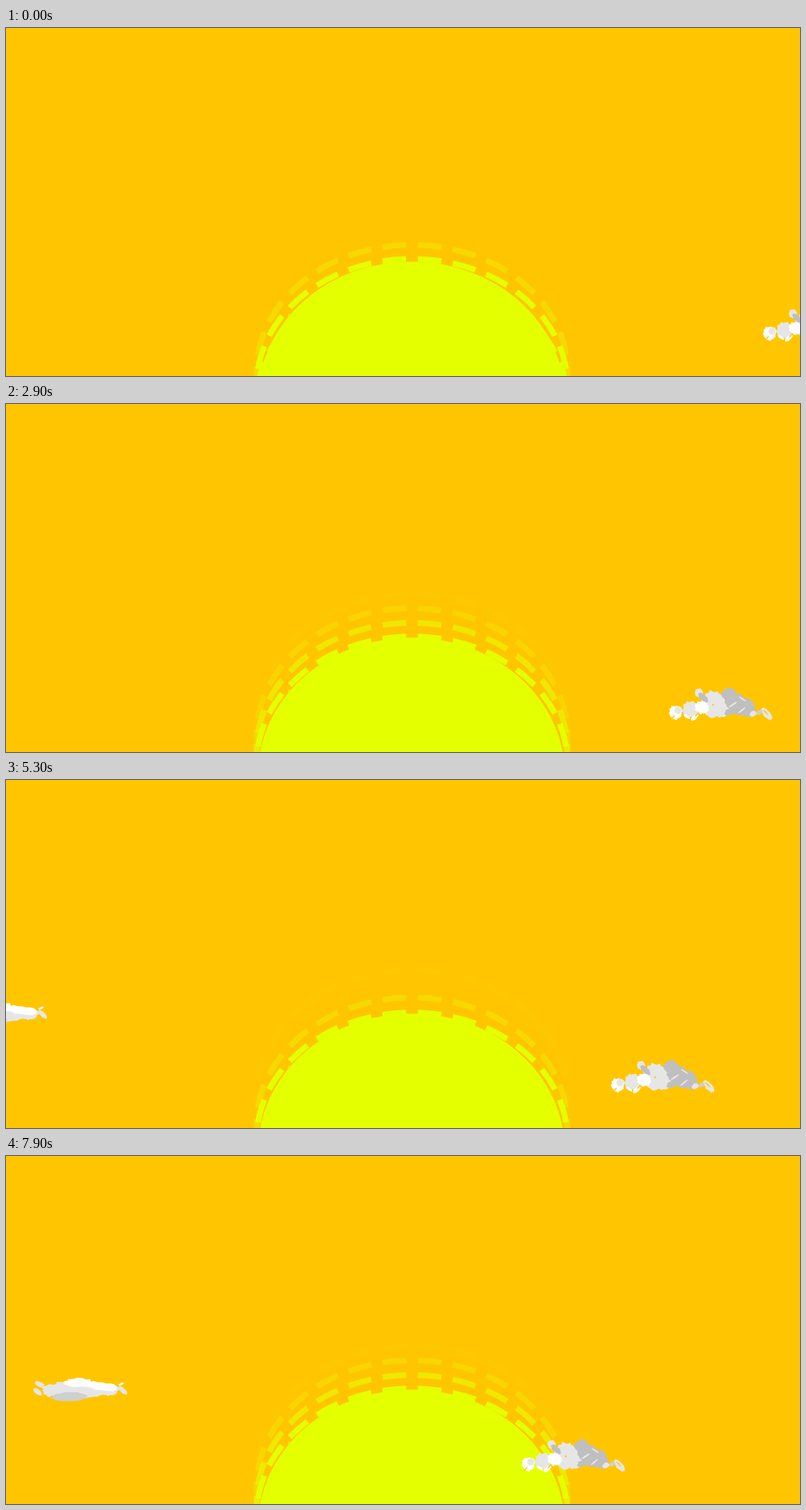
These frames come from a looping animation (1129 by 496 pixels, 8 s). An HTML page with a canvas:

```html
<!DOCTYPE html>
<html lang="en">
<head>
<meta charset="utf-8">
<title>Sunrise</title>
<style>
  html, body { margin: 0; width: 100%; height: 100%; overflow: hidden; background: #ffc600; }
  canvas { display: block; }
</style>
</head>
<body>
<canvas id="sky" width="1129" height="496"></canvas>
<script>
const ctx = document.getElementById('sky').getContext('2d');
const W = 1129, H = 496, LOOP = 8000, STEP = 100;
const SKY = '#ffc600', SUN = '#e4ff00';
const WHITE = '#ffffff', LIGHT = '#e6e6e6', MID = '#cfcfcf', DARK = '#bfbfbf';

// Linear interpolation through [time, value] pairs
function track(keys, t) {
  if (t <= keys[0][0]) return keys[0][1];
  for (let i = 1; i < keys.length; i++) {
    const [t0, a] = keys[i - 1], [t1, b] = keys[i];
    if (t <= t1) return a + (b - a) * (t - t0) / (t1 - t0);
  }
  return keys[keys.length - 1][1];
}

// Each ring: height of its top and opacity over time
const rings = [
  { y: [[0, 309], [1700, 282], [2600, 271]],
    a: [[0, .32], [1700, .12], [2700, .04]] },
  { y: [[0, 329], [1700, 303], [2600, 291]],
    a: [[0, 1], [1700, .55], [2700, .27], [3800, .14], [4500, 0], [5400, 0], [6100, .12], [7200, .27]] },
  { y: [[0, 352.5], [1700, 326.5], [2600, 312], [3800, 311], [4500, 310], [5400, 310], [6100, 311], [7200, 312]],
    a: [[0, 1], [1700, .72], [2700, .6], [3800, .48], [4500, .32], [5400, .32], [6100, .48], [7200, .6]] },
  { y: [[0, 367], [1700, 342], [2600, 331.3]],
    a: [[0, 1]] }
];

const cloudX = [[0, 1077], [1700, 995], [2700, 950], [3600, 920], [4500, 890], [5300, 861],
  [6100, 823], [7200, 770], [7900, 734]];
const cloudY = [[0, 399], [1700, 403], [2900, 403.5], [3800, 401], [5300, 398.5], [6100, 400.5], [7900, 403]];
const wispX = [[3800, -143], [5300, -77], [6100, -42], [7200, 6], [7900, 37]];

function random(seed) {
  return () => {
    seed = (seed * 16807) % 2147483647;
    return seed / 2147483647;
  };
}

// Ragged blob: [x, y, rx, ry, color, tilt]
function blob([x, y, rx, ry, color, tilt = 0], seed) {
  const rnd = random(seed * 7919 + 13), path = new Path2D(), n = 34;
  rnd();
  for (let i = 0; i < n; i++) {
    const q = i / n * Math.PI * 2, k = .86 + .26 * rnd();
    const u = Math.cos(q) * rx * k, v = Math.sin(q) * ry * k;
    path.lineTo(x + u * Math.cos(tilt) - v * Math.sin(tilt), y + u * Math.sin(tilt) + v * Math.cos(tilt));
  }
  path.closePath();
  return { path, color };
}

const cloud = [
  [138, 38, 11, 4.5, LIGHT, .85],
  [128, 36, 5, 3, MID, -.6],
  [42, 8, 5.5, 6.5, LIGHT],
  [63, 24, 19, 19, LIGHT],
  [72, 32, 17, 11, LIGHT],
  [30, 32, 11, 11.5, LIGHT, -.4],
  [9, 36, 9, 10, WHITE],
  [12, 33, 5, 5, LIGHT, -.5],
  [46, 29, 10, 9, WHITE, .4],
  [36, 43, 7, 3, WHITE, -.7],
  [25, 42, 5, 2, WHITE, .6],
  [48, 15, 9, 4, DARK, .75],
  [85, 11, 11, 10, DARK, .5],
  [94, 22, 16, 13, DARK, .6],
  [88, 34, 11, 5, DARK, -.5],
  [113, 29, 9, 14, DARK, -.3],
  [105, 37, 13, 4, DARK, .1],
  [119, 38, 5, 4, LIGHT, -.6],
  [90, 25, 7, 1.3, LIGHT, -.6],
  [104, 17, 6, 1, LIGHT, .6],
  [103, 33, 7, 1.1, LIGHT, -.7],
  [39, 39, 4, .9, SKY, -.8],
  [5, 43, 4, .9, SKY, -.8],
  [62, 25, 1.5, 1.2, SKY],
  [137, 36, 5, .8, SKY, .8]
].map((b, i) => blob(b, i + 1));

const wisp = [
  [12, 10, 9, 3.5, LIGHT, .45],
  [8, 20, 8, 3.5, LIGHT, .65],
  [25, 18, 10, 9, LIGHT, .3],
  [57, 16, 33, 12, LIGHT],
  [85, 20, 27, 8, LIGHT, -.08],
  [111, 18, 13, 7, LIGHT, -.2],
  [129, 18, 8, 3.5, LIGHT, .75],
  [53, 27, 26, 6.5, MID, -.04],
  [66, 7, 20, 6.5, WHITE],
  [98, 12, 22, 6, WHITE, .12],
  [112, 14, 8, 5.5, WHITE],
  [127, 9, 4, 1.5, WHITE, -.4],
  [21, 10, 6, .9, SKY, -.4],
  [125, 20, 3, 1, SKY, .6]
].map((b, i) => blob(b, i + 50));

function drawBlobs(list, x, y) {
  ctx.save();
  ctx.translate(x, y);
  for (const b of list) {
    ctx.fillStyle = b.color;
    ctx.fill(b.path);
  }
  ctx.restore();
}

// Dashes run outwards from a gap at the top, mirrored left and right
function drawRing(top, alpha) {
  if (alpha <= 0) return;
  ctx.save();
  ctx.globalAlpha = alpha;
  ctx.strokeStyle = SUN;
  ctx.lineWidth = 8;
  ctx.setLineDash([33.5, 16.5]);
  ctx.lineDashOffset = 41.5;
  for (const left of [false, true]) {
    ctx.beginPath();
    ctx.ellipse(577.3, top + 181, 221, 181, 0, -Math.PI / 2, left ? -Math.PI * 1.5 : Math.PI / 2, left);
    ctx.stroke();
  }
  ctx.restore();
}

function drawSun() {
  ctx.fillStyle = SUN;
  ctx.beginPath();
  ctx.ellipse(576.5, 528, 218, 195, 0, 0, Math.PI * 2);
  ctx.fill();
  ctx.beginPath();
  ctx.moveTo(401.5, 407);
  ctx.lineTo(406, 410);
  ctx.lineTo(402, 414);
  ctx.fill();
}

function draw(t) {
  ctx.fillStyle = SKY;
  ctx.fillRect(0, 0, W, H);
  for (const r of rings) drawRing(track(r.y, t), track(r.a, t));
  drawSun();
  drawBlobs(wisp, track(wispX, t), 316);
  drawBlobs(cloud, track(cloudX, t), track(cloudY, t));
}

let start;
function tick(now) {
  if (start === undefined) start = now;
  const t = (now - start) % LOOP;
  draw(Math.floor(t / STEP) * STEP);
  requestAnimationFrame(tick);
}
draw(0);
requestAnimationFrame(tick);
</script>
</body>
</html>
```
